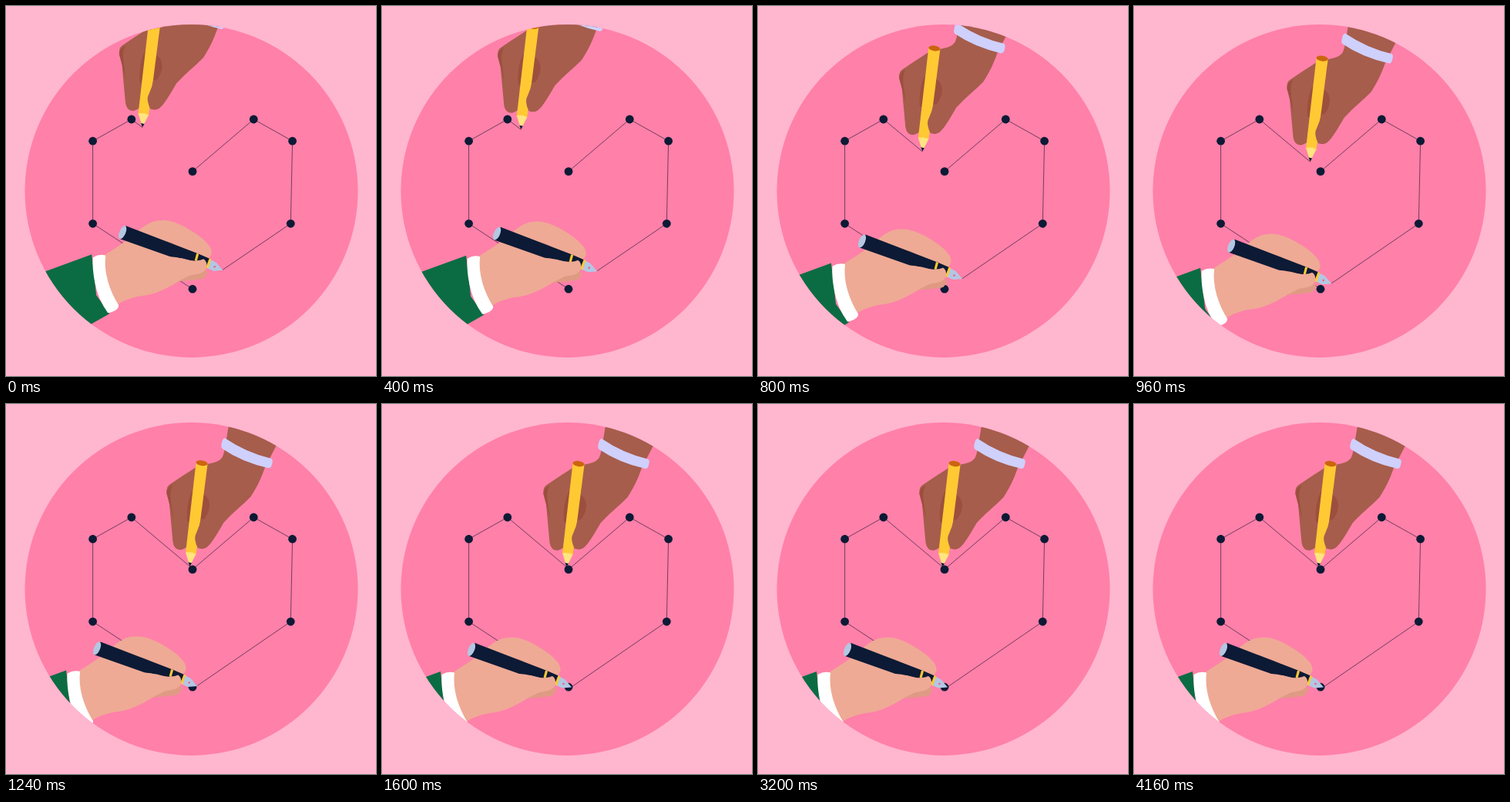
An HTML page for the animation above (5 s loop, 480 px wide and 480 px high).

```html
<!DOCTYPE html>
<html lang="en">
<head>
<meta charset="utf-8">
<title>Two hands drawing a heart</title>
<style>
  html, body { margin: 0; height: 100%; overflow: hidden; background: #ffb6cf; }
  svg { display: block; width: 100vw; height: 100vh; }
  .line { fill: none; stroke: #2a1733; stroke-width: .65; }
  .ink { fill: #0c1a35; }
  .skin { fill: #eeaa95; }
  .skin-shade { fill: #e09a84; }
  .brown { fill: #a65d4c; }
  .brown-shade { fill: #9c4f3e; }
  .gold { fill: #ffc933; }
  .steel { fill: #b3c7e3; }
</style>
</head>
<body>
<svg viewBox="0 0 480 480">
  <clipPath id="disc"><circle cx="240.5" cy="240" r="216"/></clipPath>
  <circle cx="240.5" cy="240" r="216" fill="#ff80a9"/>

  <path class="line" d="M162.800 147L112.600 175.200V282.300L242 367.200M242 214.600L321.300 147L371.600 175.200L369.300 282.300"/>
  <path class="line" id="topLine"/>
  <path class="line" id="lowLine"/>
  <g class="ink" id="dots"></g>

  <g clip-path="url(#disc)">
    <g id="pencilHand">
      <path class="brown" d="M291 22L285 58C283 68 282 73 273 76C264 79 256 79 247 83C236 90 224 98 213 105.500Q208.500 109 209.500 117L213 131L217.500 180Q219 190 228 190Q236 187 241 182L248 186Q253 190.500 261 187C270 179 276 167 283.500 154.500C296 141 308 132 318.500 121C327 108 332 97 337 83L367 25Z"/>
      <path class="brown-shade" d="M218 105Q212 112 216 134L218 150L213 129L209.500 117Q209 109 218 105Z"/>
      <path class="brown-shade" d="M243 113C254 113 265 120 265 131C265 143 258 150 251 159L236 153C235 139 237 122 243 113Z"/>
      <path class="gold" d="M247.500 77L262.500 79L247.500 196L234 194Z"/>
      <ellipse cx="255" cy="77.500" rx="7.600" ry="3.500" fill="#cb650f" transform="rotate(8 255 77.500)"/>
      <path d="M234 193.500Q241 192 247.500 195.500L239.500 211Z" fill="#ffe47f"/>
      <path class="ink" d="M237.500 206L242 207L239.500 211.500Z"/>
      <path class="brown" d="M254 150Q252 159 248 168Q245 173 247 180Q248 188 256 188.500Q264 187 270 176L268 151Z"/>
      <path d="M285 45Q313 64 345 71.500Q348 73 346 79Q345 84.500 341 83.800Q307 76 282 59Q279 57 281 51Q282 45 285 45Z" fill="#cfd0fc"/>
    </g>

    <g id="penHand">
      <path d="M-10 378.500L76 347L82 400L99 424L60 446Z" fill="#0b6c43"/>
      <path class="skin-shade" d="M186 382Q205 381 219 379Q225 377 226 370L215 360L185 365Z"/>
      <path class="skin" d="M91 349C110 337 125 327 138 315C147 308 154 303 166 303C177 302 188 307 198 312C210 319 221 326 226 333Q232 339 231.500 346Q229 353 222 355L210 373C203 373 197 378 190 381C174 391 159 399 140 401C127 403 116 407 107 414C92 397 88 370 91 349Z"/>
      <path class="skin-shade" d="M159 331C170 328 180 330 188 337L186 342L160 333Z"/>
      <path fill="#fff" d="M77.500 351Q86 346 94 348.500Q92 364 97 382Q102 399 111 413Q111 420 97 423Q84 405 80 383Q76.500 365 77.500 351Z"/>
      <path class="ink" d="M120.500 310L214 346L229 352.500L226 363L209 356L193 352L181 351L113 327Z"/>
      <ellipse class="steel" cx="116" cy="318.500" rx="4" ry="9" transform="rotate(23 116 318.500)"/>
      <path class="steel" d="M229 353L237.500 357.500L246 367.500L234 368.500L224 364Z"/>
      <circle cx="235.500" cy="363" r="1.300" fill="#f05f87"/>
      <path class="gold" d="M212 345.500L215 346.500L212.500 355.500L209.500 355ZM228.500 352L231 353L227 365.500L224 364Z"/>
      <path class="skin" d="M178 350Q186 350 193 352.500Q204 356 212 355Q217 355 221 353Q226 356 225 364Q222 372 210 373L185 376Z"/>
    </g>
  </g>
</svg>
<script>
const $ = id => document.getElementById(id);
const points = [
  [162.8, 147], [112.6, 175.2], [112.6, 282.3], [242, 367.2],
  [369.3, 282.3], [371.6, 175.2], [321.3, 147], [242, 214.6]
];
$('dots').innerHTML = points.map(([x, y]) => `<circle cx="${x}" cy="${y}" r="5.4"/>`).join('');

function ease(u, power) {
  if (u >= 1) return 1;
  return u < .5 ? (2 * u) ** power / 2 : 1 - (2 - 2 * u) ** power / 2;
}

// Slide a hand to rest from its offset, drawing the line up to its tip.
function place(hand, line, start, tip, offset, left) {
  const [dx, dy] = offset.map(v => v * left);
  $(hand).setAttribute('transform', `translate(${dx} ${dy})`);
  $(line).setAttribute('d', `M${start}L${tip[0] + dx} ${tip[1] + dy}`);
}

function frame(now) {
  const t = Math.floor(now % 5000 / 40) * 40;
  place('pencilHand', 'topLine', points[0], [239.5, 211.5], [-62.5, -54], 1 - ease(t / 1525, 3.5));
  place('penHand', 'lowLine', points[4], [246, 367], [35.2, -24.8], 1 - ease(t / 1645, 3));
  requestAnimationFrame(frame);
}
frame(0);
</script>
</body>
</html>
```
